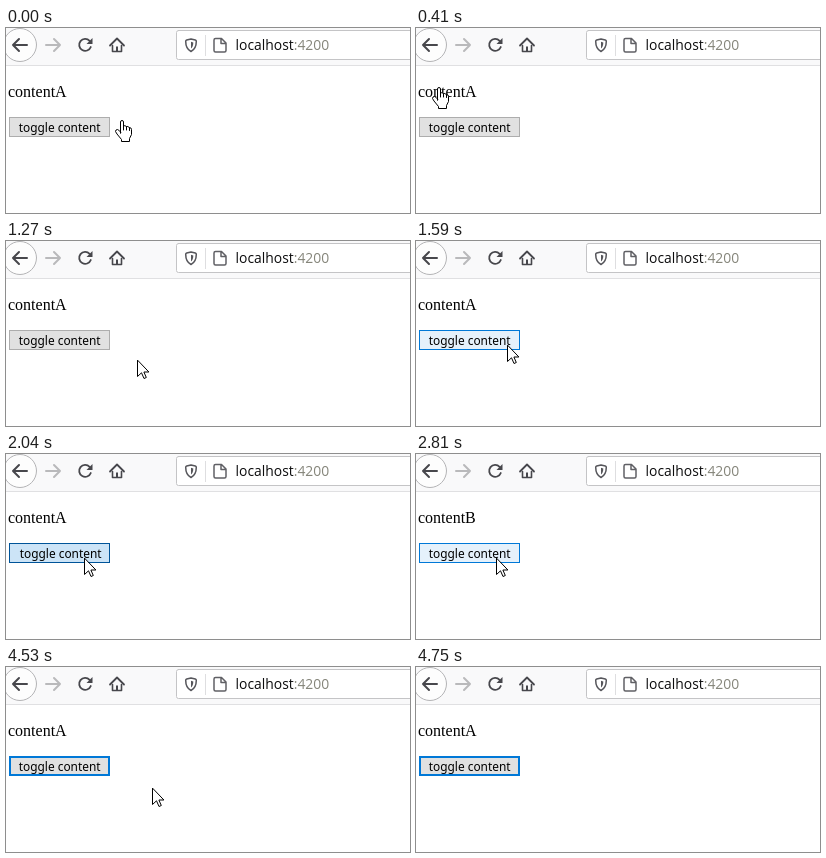
Write an HTML page with a canvas that moves like this. It is 404 px wide and 185 px high and loops after 5200 ms.

```html
<!DOCTYPE html>
<html lang="en">
<head>
<meta charset="utf-8">
<title>Toggle content</title>
<style>
html, body { margin: 0; width: 100%; height: 100%; overflow: hidden; background: #fff; }
canvas { display: block; }
</style>
</head>
<body>
<canvas id="stage" width="404" height="185"></canvas>
<script>
const ctx = document.getElementById('stage').getContext('2d');
const LOOP = 5200;

const ARROW = new Path2D('M.5 .5V16.5L4.5 12.8L7 18.5L9.3 17.5L6.9 12H11.5Z');
const HAND = new Path2D('M5.5 13V2Q5.5 .5 7 .5T8.5 2V6Q10 5 11.3 6.5Q13 6 14.2 7.5Q16.5 7.5 16.5 9.5V14.5L14.5 18.5V21.5H6.5V19.5L2 14L.5 11.5Q.5 9.5 2.5 9.5Q3.5 9.5 5.5 12Z');
const KNUCKLES = new Path2D('M8.5 6V10M11.5 6.8V10M14.5 8V10.5');

// Each entry holds from its time until the next one.
const POINTER = [
  [0, 'hand', 109, 92], [100, 'hand', 82, 83], [210, 'hand', 42, 66],
  [310, 'hand', 16, 59], [420, 'hand', 48, 75], [530, 'hand', 88, 97],
  [630, 'hand', 92, 104], [740, 'hand', 97, 112], [840, 'hand', 102, 119],
  [940, 'hand', 106, 121], [1060, 'hand', 123, 120], [1160, 'hand', 125, 118],
  [1270, 'arrow', 131, 119], [1490, 'arrow', 110, 110], [1590, 'arrow', 91, 104],
  [1710, 'arrow', 82, 104], [1810, 'arrow', 78, 104], [2690, 'arrow', 79, 104],
  [2810, 'arrow', 80, 104], [3240, 'arrow', 81, 104], [4530, 'arrow', 146, 121],
  [4640, 'arrow', 231, 136], [4750, 'none', 0, 0]
];
const BUTTON = [
  [0, 'idle'], [1590, 'hover'], [2040, 'pressed'], [2140, 'hover'],
  [3240, 'pressed'], [3340, 'hover'], [4530, 'focus']
];
const LOOK = {
  idle: ['#e1e1e1', '#adadad', 1],
  hover: ['#e5f1fb', '#0078d7', 1],
  pressed: ['#cce4f7', '#005499', 1],
  focus: ['#e1e1e1', '#0078d7', 2]
};

const at = (keys, t) => keys.findLast(k => k[0] <= t);

function rect(x, y, w, h, color) {
  ctx.fillStyle = color;
  ctx.fillRect(x, y, w, h);
}

function fill(path, color) {
  ctx.fillStyle = color;
  ctx.fill(typeof path === 'string' ? new Path2D(path) : path);
}

function stroke(path, color, width) {
  ctx.strokeStyle = color;
  ctx.lineWidth = width;
  ctx.stroke(typeof path === 'string' ? new Path2D(path) : path);
}

function text(str, x, y, font, color) {
  ctx.font = font;
  ctx.fillStyle = color;
  ctx.fillText(str, x, y);
}

function drawToolbar() {
  const ink = '#47474c';
  rect(0, 0, 404, 37, '#f9f9fa');
  rect(0, 37, 404, 1, '#e0e0e2');
  ctx.lineJoin = 'round';
  ctx.lineCap = 'round';

  const ring = new Path2D();
  ring.arc(14, 17, 16.5, 0, Math.PI * 2);
  fill(ring, '#fdfdfd');
  stroke(ring, '#b4b4b6', 1);
  stroke('M21 17H7M13 11L7 17L13 23', ink, 2);
  stroke('M40 17H54M48 11L54 17L48 23', '#b9b9bb', 2);

  // Reload and home
  stroke('M83.6 12.8A6 6 0 1 0 84.8 19', ink, 1.8);
  fill('M86.5 10V16H80.5Z', ink);
  stroke('M104 17.5L111 10.5L118 17.5', ink, 1.8);
  stroke('M106.5 17.5V23.5H115.5V17.5', ink, 1.6);
  rect(110, 18.5, 2, 5, ink);

  const bar = new Path2D();
  bar.roundRect(170.5, 2.5, 260, 29, 2);
  fill(bar, '#fff');
  stroke(bar, '#c4c4c6', 1);

  // Shield and page
  stroke('M185 11L189.3 12Q190.3 12.3 190.3 13.3C190.3 18.5 188.5 21.8 185 23.5C181.5 21.8 179.7 18.5 179.7 13.3Q179.7 12.3 180.7 12Z', '#56565b', 1.5);
  fill('M185 13.8L187.3 14.4C187.3 17.5 186.5 19.3 185 20.4Z', '#56565b');
  rect(199, 7, 1, 21, '#dedee0');
  stroke('M209.5 10.5H215.5L220 15V22.5Q220 24 218.5 24H209.5Q208 24 208 22.5V12Q208 10.5 209.5 10.5ZM215 11V15.5H219.5', '#606065', 1.5);

  const font = '13.9px "Open Sans", sans-serif';
  text('localhost', 229.5, 22, font, '#0c0c0d');
  text(':4200', 229.5 + ctx.measureText('localhost').width, 22, font, '#85857a');
}

function drawButton(state) {
  const [face, edge, line] = LOOK[state];
  rect(3, 89, 101, 20, edge);
  rect(3 + line, 89 + line, 101 - 2 * line, 20 - 2 * line, face);
  const shift = state === 'pressed' ? 1 : 0;
  text('toggle content', 12.7 + shift, 104, '11.9px "Noto Sans", sans-serif', '#000');
}

function drawPointer(kind, x, y) {
  if (kind === 'none') return;
  const shape = kind === 'hand' ? HAND : ARROW;
  ctx.save();
  ctx.translate(x, y);
  ctx.lineJoin = 'miter';
  fill(shape, '#fff');
  stroke(shape, '#000', 1);
  if (kind === 'hand') stroke(KNUCKLES, '#000', 1);
  ctx.restore();
}

function draw() {
  const t = performance.now() % LOOP;
  rect(0, 0, 404, 185, '#fff');
  drawToolbar();
  const showB = t >= 2140 && t < 3340;
  text(showB ? 'contentB' : 'contentA', 2, 69, '16px "Liberation Serif", serif', '#000');
  drawButton(at(BUTTON, t)[1]);
  drawPointer(...at(POINTER, t).slice(1));
  requestAnimationFrame(draw);
}
draw();
</script>
</body>
</html>
```
